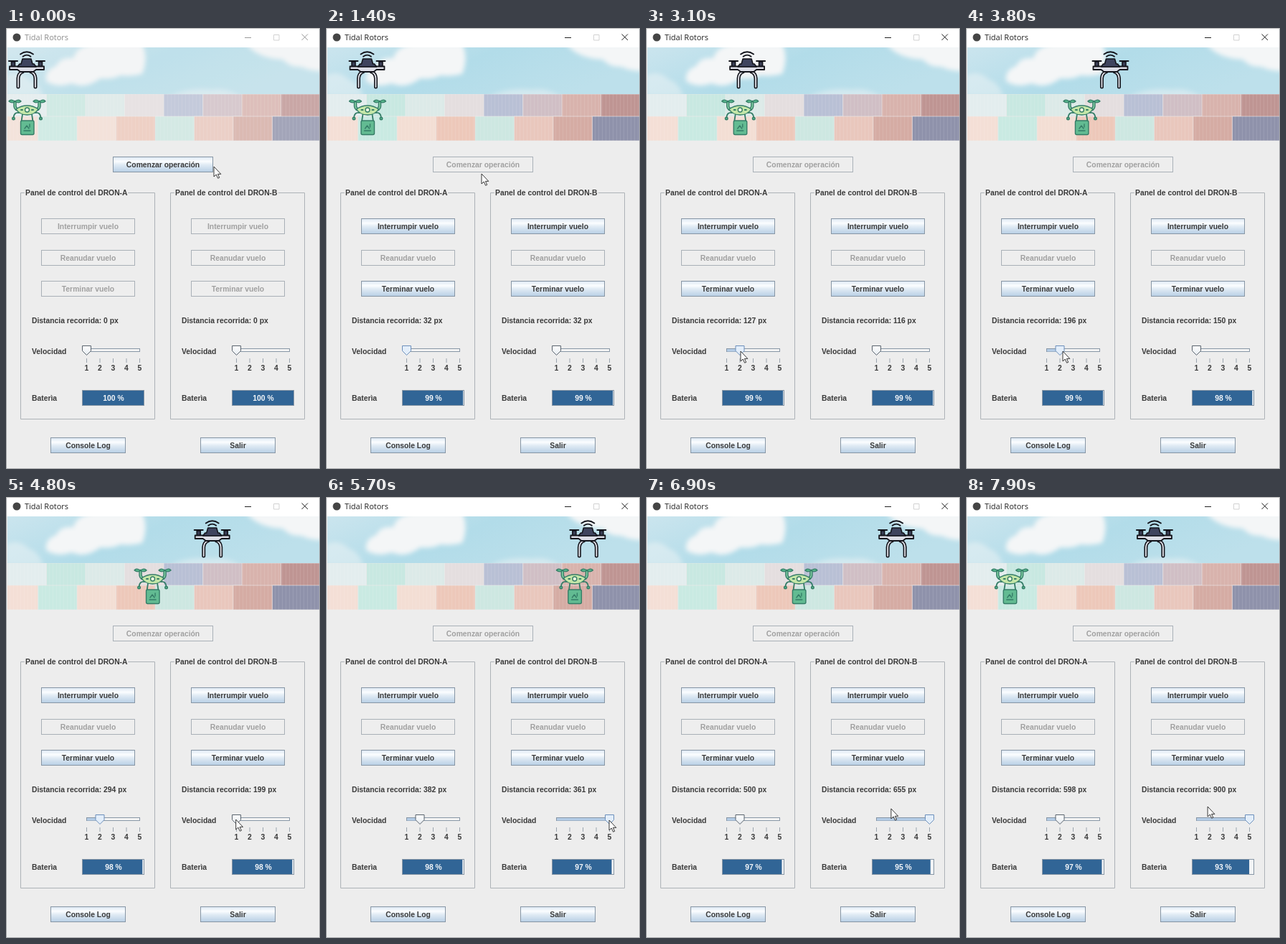
An HTML page for the animation above (8 s loop, 438 by 614 pixels).

```html
<!DOCTYPE html>
<html lang="es">
<head>
<meta charset="utf-8">
<title>Panel de vuelo</title>
<style>
  html, body { margin: 0; width: 100%; height: 100%; overflow: hidden; background: #ededed; }
  svg { display: block; }
  text { font: bold 10.35px "Liberation Sans", Arial, sans-serif; fill: #3a3a3a; }
  .mid { text-anchor: middle; }
  .legend { stroke: #ededed; stroke-width: 4px; paint-order: stroke; }
  .title { font: 11px "Open Sans", "Noto Sans", sans-serif; fill: #222; }
  .glyph { fill: none; stroke: #222; }
  .idle .title { fill: #8c8c8c; }
  .idle .glyph { stroke: #999; }
  .btn rect { fill: url(#metal); stroke: #8796a5; }
  .btn.hover rect { stroke: #6f94b8; stroke-width: 2; }
  .btn.down rect { fill: #b8cfe5; }
  .btn.off rect { fill: #eee; stroke: #a9b0b7; }
  .btn.off text { fill: #a0a0a0; }
  .thumb { fill: url(#knob); stroke: #59636d; }
  .focus .thumb { fill: #e3eefa; stroke: #6c8fbb; }
  .pct { fill: #f4f7fa; }
</style>
</head>
<body>
<svg id="stage" width="438" height="614" viewBox="0 0 438 614">
  <defs>
    <linearGradient id="metal" x2="0" y2="1">
      <stop offset="0" stop-color="#dde8f3"/><stop offset=".3" stop-color="#fbfdff"/>
      <stop offset=".5" stop-color="#e2ecf5"/><stop offset="1" stop-color="#b8cfe5"/>
    </linearGradient>
    <linearGradient id="knob" x2="0" y2="1">
      <stop offset="0" stop-color="#fff"/><stop offset="1" stop-color="#e4eaf0"/>
    </linearGradient>
    <linearGradient id="sky" x2="1" y2=".35">
      <stop offset="0" stop-color="#cbe5ee"/><stop offset=".5" stop-color="#b2dce9"/><stop offset="1" stop-color="#bde0eb"/>
    </linearGradient>
    <pattern id="ridge" width="5" height="8" patternUnits="userSpaceOnUse">
      <path d="M.5 0V8" stroke="#fff" stroke-opacity=".1"/>
    </pattern>
    <filter id="soft" x="-20%" y="-40%" width="140%" height="180%"><feGaussianBlur stdDeviation="3"/></filter>
    <clipPath id="skyBox"><path d="M2 27H438V92H2z"/></clipPath>
    <clipPath id="yardBox"><path d="M2 92H438V157H2z"/></clipPath>

    <g id="droneA" stroke="#14151c" stroke-linecap="round" stroke-linejoin="round">
      <g id="halfA">
        <path d="M1 14H13" stroke-width="2" fill="none"/>
        <path d="M4.500 15h5v7h-5z" fill="#3a3e55" stroke-width="1.600"/>
        <path d="M20 29Q14.500 31 14 38V50" fill="none" stroke-width="5"/>
        <path d="M20 29Q14.500 31 14 38V50" fill="none" stroke="#e6e7ee" stroke-width="1.800"/>
      </g>
      <use href="#halfA" transform="matrix(-1 0 0 1 52 0)"/>
      <path d="M2 21.500H50V26H39L35 29H17L13 26H2z" fill="#dcdde6" stroke-width="1.800"/>
      <path d="M13 22 16 18H18L20 11H32L34 18H36L39 22z" fill="#3f445e" stroke-width="1.600"/>
      <path d="M17 4.500Q26-2 35 4.500M20.500 7.800Q26 3.500 31.500 7.800" fill="none" stroke-width="1.800"/>
    </g>

    <g id="droneB" stroke="#357d67" stroke-linecap="round" stroke-linejoin="round" stroke-width="1.400">
      <g id="halfB">
        <path d="M9.500 6V12Q10 17 17 17" fill="none" stroke-width="4.500"/>
        <path d="M9.500 7V12Q10 17 17 17" fill="none" stroke="#7fcaa0" stroke-width="1.800"/>
        <path d="M15 21Q8 20 7.500 28" fill="none" stroke-width="1.800"/>
        <circle cx="7.500" cy="29" r="1.800" fill="#58b78c"/>
        <path d="M9.500 5.500Q5 8.500 1 5Q4 1 9.500 5.500Q15 8.500 18 5Q14 1 9.500 5.500z" fill="#58b78c"/>
        <path d="M20 23 18.500 33" fill="none" stroke-width="1.800"/>
      </g>
      <use href="#halfB" transform="matrix(-1 0 0 1 53 0)"/>
      <path d="M11 16Q18 11 26.500 11T42 16Q37 24 26.500 24T11 16z" fill="#c4e6a8"/>
      <circle cx="26.500" cy="17" r="3" fill="#eef6df"/>
      <path d="M18 17h2M33 17h2" stroke-width="2"/>
      <rect x="17.500" y="32" width="18.500" height="19.500" rx="2" fill="#62bb92"/>
      <path d="M23 43l3-4 3 4M22 46h9M30 37v4" fill="none"/>
    </g>
  </defs>

  <path fill="#ededed" d="M0 0H438V614H0z"/>
  <path fill="#fff" d="M0 0H438V27H0z"/>
  <g id="bar">
    <circle cx="15" cy="13" r="5.500" fill="#454545"/>
    <text class="title" x="26" y="17">Tidal Rotors</text>
    <path class="glyph" d="M333 13.500H342M412.500 8.500 421 17M421 8.500 412.500 17"/>
    <path d="M373.500 9.500h7.500v7.500h-7.500z" fill="none" stroke="#d2d2d2"/>
  </g>

  <g clip-path="url(#skyBox)">
    <path fill="url(#sky)" d="M0 27H438V92H0z"/>
    <g filter="url(#soft)" fill="#f4f6f7">
      <path d="M56 74Q54 58 70 53Q76 40 94 42Q98 26 122 22H190Q199 42 190 64Q174 68 160 66Q148 72 132 70Q110 86 92 77Q72 84 56 74z"/>
      <path d="M335 22H444V60Q424 60 412 54Q396 55 386 44Q350 42 335 22z"/>
      <path d="M225 97Q250 82 288 86Q308 82 330 97z" opacity=".45"/>
      <path d="M0 66Q18 58 32 72Q46 76 52 95H0z" opacity=".45"/>
    </g>
  </g>
  <g id="yard" clip-path="url(#yardBox)"></g>
  <path id="haze" fill="#ededed" d="M2 27H438V157H2z"/>

  <use id="flyA" href="#droneA"/>
  <use id="flyB" href="#droneB"/>
  <g id="ui"></g>
  <path d="M.5 0V614M437.500 0V614M0 613.500H438" stroke="#a3a5a8"/>
  <path d="M0 .5H438" stroke="#b4b4b4"/>
  <path id="mouse" d="M0 0V14L3.200 11 5.600 16.200 7.700 15.300 5.400 10.400H9.800z" fill="#fff" stroke="#222" stroke-width=".9"/>
</svg>
<script>
const $ = id => document.getElementById(id);
const LOOP = 8000, STEP = 100, START = 740;
const RATE = .049;                // px per ms for each speed level
const SCALE = .88, TRAVEL = 380;  // screen px per flown px, and the turning point
const RAIL = 112.5, NOTCH = 18.5;

// Stacked containers, left to right
const rows = [
  '#e3edee #c8e8e1 #dceae8 #e4dedf #b9c0d5 #d0bfc5 #d8b3ad #bf9593',
  '#f4dfd6 #c9eae2 #f3ded4 #edc8ba #cde7e1 #e9c7bd #d5aca4 #8f92ab'
];
$('yard').innerHTML = rows.map((row, r) => row.split(' ').map((color, i) =>
  `<rect x="${54.5 * i - 12 * r + 2}" y="${92 + 31 * r}" width="66" height="34" fill="${color}" stroke="#eceae9" stroke-opacity=".6"/>`
).join('')).join('') + '<path fill="url(#ridge)" d="M2 92H438V157H2z"/>';

const button = (id, x, y, w, label) => `<g class="btn" id="${id}">
  <rect x="${x + .5}" y="${y + .5}" width="${w}" height="21"/>
  <text class="mid" x="${x + w / 2 + .5}" y="${y + 14.5}">${label}</text></g>`;

const notchMark = i => `<path d="M${RAIL + i * NOTCH} 460v6" stroke="#9aa4ae"/>
  <text class="mid" x="${RAIL + i * NOTCH}" y="476.500">${i + 1}</text>`;

const panel = (k, x) => `<g transform="translate(${x})">
  <path d="M20.500 229.500H207.500V544.500H20.500z" fill="none" stroke="#adb2b7"/>
  <text class="legend" x="27" y="233">Panel de control del DRON-${k}</text>
  ${button('stop' + k, 49, 265, 130, 'Interrumpir vuelo')}
  ${button('resume' + k, 49, 309, 130, 'Reanudar vuelo')}
  ${button('end' + k, 49, 352, 130, 'Terminar vuelo')}
  <text id="dist${k}" x="36" y="410.500"></text>
  <text x="36" y="454">Velocidad</text>
  <g id="slider${k}">
    <rect x="${RAIL}" y="446.500" width="74" height="4" fill="#f4f4f4" stroke="#8796a5"/>
    <rect id="fill${k}" x="113" y="447" height="3.500" fill="#b4cce6"/>
    <path id="thumb${k}" class="thumb" d="M-6 442.500H6V449.500L0 455.500-6 449.500z"/>
  </g>
  ${[0, 1, 2, 3, 4].map(notchMark).join('')}
  <text x="36" y="519">Baterìa</text>
  <rect x="106.500" y="504.500" width="86" height="21" fill="#f2f4f6" stroke="#8796a5"/>
  <rect id="charge${k}" x="107" y="505" height="20" fill="#316596"/>
  <text id="pct${k}" class="mid pct" x="150" y="519"></text></g>`;

$('ui').innerHTML = button('begin', 149, 179, 139, 'Comenzar operación') +
  panel('A', 0) + panel('B', 209) +
  button('log', 62, 570, 104, 'Console Log') + button('quit', 271, 570, 104, 'Salir');

// press, drag: when the slider is grabbed and for how long; range: px flown per battery point
const drones = {
  A: { y: 32, press: 2650, drag: 420, notches: 1, range: 200 },
  B: { y: 97, press: 4825, drag: 550, notches: 4, range: 135 }
};
const { A, B } = drones;
const mouseStops = [
  [0, 290, 193], [600, 235, 190], [START, 234, 191], [1400, 217, 203], [2400, 106, 446],
  [A.press, 110, 447], [A.press + A.drag, 132, 450], [3800, 135, 450],
  [B.press, 321, 449], [B.press + B.drag, 395, 450], [6000, 395, 450],
  [6800, 342, 434], [LOOP, 337, 431]
];

const clamp = p => Math.max(0, Math.min(1, p));
const smooth = p => p * p * (3 - 2 * p);
const bounce = u => TRAVEL - Math.abs(u % (2 * TRAVEL) - TRAVEL);
const set = (id, name, value) => $(id).setAttribute(name, value);
const flag = (id, name, on) => $(id).classList.toggle(name, on);

// Every notch passed adds one more unit of speed
function distance(d, t) {
  let time = Math.max(0, t - START);
  for (let n = 1; n <= d.notches; n++)
    time += Math.max(0, t - d.press - d.drag * (n - .5) / d.notches);
  return RATE * time;
}

function mouseAt(t) {
  const i = mouseStops.findIndex(stop => stop[0] > t);
  const [t0, x0, y0] = mouseStops[i - 1], [t1, x1, y1] = mouseStops[i];
  const p = smooth((t - t0) / (t1 - t0));
  return `${x0 + (x1 - x0) * p} ${y0 + (y1 - y0) * p}`;
}

function draw(t) {
  const flying = t >= START;
  flag('bar', 'idle', t < 600);
  set('haze', 'opacity', flying ? 0 : .2);
  flag('begin', 'hover', t >= 300 && !flying);
  flag('begin', 'down', t >= 600 && !flying);
  flag('begin', 'off', flying);

  for (const k in drones) {
    const d = drones[k], flown = distance(d, t);
    const charge = 100 - Math.ceil(flown / d.range);
    const slide = smooth(clamp((t - d.press) / d.drag)) * d.notches * NOTCH;
    set('fly' + k, 'transform', `translate(${3 + bounce(flown * SCALE)} ${d.y})`);
    flag('stop' + k, 'off', !flying);
    flag('resume' + k, 'off', true);
    flag('end' + k, 'off', !flying);
    $('dist' + k).textContent = `Distancia recorrida: ${Math.round(flown)} px`;
    set('thumb' + k, 'transform', `translate(${RAIL + slide})`);
    set('fill' + k, 'width', slide);
    set('charge' + k, 'width', .85 * charge);
    $('pct' + k).textContent = charge + ' %';
  }
  flag('sliderA', 'focus', flying && t < B.press);
  flag('sliderB', 'focus', t >= B.press);
  set('mouse', 'transform', `translate(${mouseAt(t)})`);
}

const origin = performance.now();
function tick() {
  const t = (performance.now() - origin) % LOOP;
  draw(Math.floor(t / STEP) * STEP);
  requestAnimationFrame(tick);
}
tick();
</script>
</body>
</html>
```
